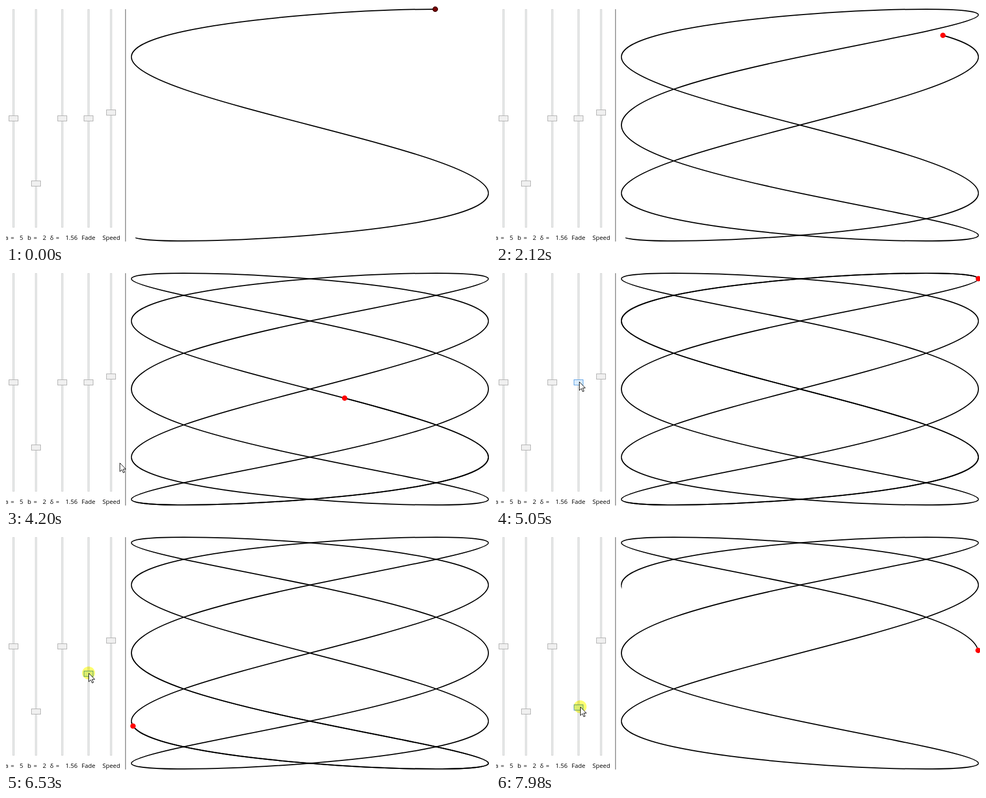
Animation, 903 px wide and 442 px high, one loop 8000 ms. Source, as an HTML page without scripts:

```html
<!DOCTYPE html>
<html lang="en">
<head>
<meta charset="utf-8">
<title>Lissajous curve</title>
<style>
/* --s counts the screen updates; everything else is derived from it. */
@property --s { syntax: "<number>"; inherits: true; initial-value: 0; }

@keyframes tick {
  0% { --s: 0; animation-timing-function: steps(1); }
  0.8125% { --s: 1; }
  11.0625% { --s: 12; }
  21.6875% { --s: 23; }
  32.1875% { --s: 34; }
  42.8125% { --s: 45; }
  53.4375% { --s: 56; }
  64.0625% { --s: 67; }
  74.8125% { --s: 78; }
  85.3125% { --s: 89; }
  95.9375% { --s: 100; animation-timing-function: steps(4); }
  99.6875%, 100% { --s: 104; }
}

html {
  height: 100%;
  background: #fff;
  overflow: hidden;
  animation: tick 8s steps(11) infinite;
}

body {
  position: relative;
  height: 100%;
  margin: 0;
  overflow: hidden;

  /* points plotted so far; plotting slows while the mouse moves */
  --n: calc(5 * var(--s)
    - 0.2 * clamp(0, var(--s) - 45, 11)
    - 0.582 * clamp(0, var(--s) - 56, 11)
    - 0.127 * clamp(0, var(--s) - 67, 11));

  /* how far the Fade thumb has been dragged down */
  --drag: calc(1.5 * clamp(0, var(--s) - 67, 10)
    + 4.53 * clamp(0, var(--s) - 77, 16)
    + 2.08 * clamp(0, var(--s) - 93, 6)
    + 2.9 * clamp(0, var(--s) - 99, 5));

  /* angles of both trail ends */
  --head: calc(11.774 + 0.1 * var(--n));
  --tail: calc(11.774 + 0.1 * max(-84, var(--n) - 2.435 * (205 - var(--drag))));

  /* mouse pointer */
  --mx: calc(212px - 5.7px * clamp(0, var(--s) - 55, 10)
    - 0.125px * clamp(0, var(--s) - 77, 16)
    + 0.67px * clamp(0, var(--s) - 93, 6)
    + 10px * clamp(0, 55 - var(--s), 2));
  --my: calc(361px - 15.2px * clamp(0, var(--s) - 55, 10)
    + 1px * var(--drag)
    + 30px * clamp(0, 55 - var(--s), 2));
}

svg {
  position: absolute;
  left: 0;
  top: 0;
  width: 903px;
  height: 442px;
}

/* Each half wave is monotone in x, so a clip between both ends reveals it. */
.trail svg {
  --from: calc(334.5px * cos(clamp(0, var(--tail) - var(--k) * pi, pi)));
  --to: calc(334.5px * cos(clamp(0, var(--head) - var(--k) * pi, pi)));
  clip-path: inset(0 calc(336px - var(--from)) 0 calc(567px + var(--to)));
  fill: none;
  stroke: #000;
  stroke-width: 2;
}
.trail svg:nth-child(odd) {
  clip-path: inset(0 calc(336px + var(--to)) 0 calc(567px - var(--from)));
}
.trail use { transform: translate(567px, 223px); }

.dot {
  transform: translate(
    calc(567px + 333px * cos(var(--head))),
    calc(223px + 217px * sin(0.4 * var(--head))));
}
.dark { opacity: clamp(0, 1 - var(--s), 1); }

.track { fill: #e7eaea; stroke: #d6d6d6; }
.thumb { fill: #f0f0f0; stroke: #acacac; }
.fade { transform: translate(154px, calc(210.5px + 1px * var(--drag))); }
.hover { fill: #daecfc; stroke: #569de5; opacity: clamp(0, var(--s) - 64, 1); }
.press {
  fill: #ffff70;
  mix-blend-mode: multiply;
  opacity: clamp(0, var(--s) - 66, 1);
  transform: translate(var(--mx), var(--my));
}
.mouse {
  fill: #fff;
  stroke: #000;
  opacity: clamp(0, var(--s) - 53, 1);
  transform: translate(var(--mx), var(--my));
}
text { font: 11.4px "Open Sans", "Noto Sans", sans-serif; word-spacing: 1.5px; }
</style>
</head>
<body>
<svg>
  <defs>
    <path id="w0" d="M333 0C333 22.7 297.1 45.5 235.5 67.1S87.2 109.2 0 127.5S-173.8 162.2 -235.5 175.6S-333 199.4 -333 206.4"/>
    <path id="w1" d="M-333 206.4C-333 213.4 -297.1 217 -235.5 217S-87.2 213.4 0 206.4S173.8 188.9 235.5 175.6S333 145.9 333 127.5"/>
    <path id="w2" d="M333 127.5C333 109.2 297.1 88.7 235.5 67.1S87.2 22.7 0 0S-173.8 -45.5 -235.5 -67.1S-333 -109.2 -333 -127.5"/>
    <use id="w3" href="#w1" transform="scale(-1)"/>
    <use id="w4" href="#w0" transform="scale(-1)"/>
    <use id="w5" href="#w0" transform="scale(-1 1)"/>
    <use id="w6" href="#w1" transform="scale(-1 1)"/>
    <use id="w7" href="#w2" transform="scale(-1 1)"/>
    <use id="w8" href="#w1" transform="scale(1 -1)"/>
    <use id="w9" href="#w0" transform="scale(1 -1)"/>
    <rect id="track" x="-1.5" y="6.5" width="3" height="408"/>
    <rect id="thumb" x="-8.5" y="-5" width="17" height="10"/>
  </defs>
</svg>

<div class="trail">
  <svg style="--k:1"><use href="#w1"/></svg>
  <svg style="--k:2"><use href="#w2"/></svg>
  <svg style="--k:3"><use href="#w3"/></svg>
  <svg style="--k:4"><use href="#w4"/></svg>
  <svg style="--k:5"><use href="#w5"/></svg>
  <svg style="--k:6"><use href="#w6"/></svg>
  <svg style="--k:7"><use href="#w7"/></svg>
  <svg style="--k:8"><use href="#w8"/></svg>
  <svg style="--k:9"><use href="#w9"/></svg>
  <svg style="--k:10"><use href="#w0"/></svg>
  <svg style="--k:11"><use href="#w1"/></svg>
  <svg style="--k:12"><use href="#w2"/></svg>
  <svg style="--k:13"><use href="#w3"/></svg>
  <svg style="--k:14"><use href="#w4"/></svg>
  <svg style="--k:15"><use href="#w5"/></svg>
  <svg style="--k:16"><use href="#w6"/></svg>
  <svg style="--k:17"><use href="#w7"/></svg>
  <svg style="--k:18"><use href="#w8"/></svg>
  <svg style="--k:19"><use href="#w9"/></svg>
</div>

<svg>
  <g class="dot">
    <circle r="5" fill="#f00"/>
    <circle class="dark" r="4.5" fill="#780000" stroke="#000"/>
  </g>

  <rect x="222" y="6" width="2" height="435" fill="#a0a0a0"/>
  <g class="track">
    <use href="#track" x="14"/>
    <use href="#track" x="56"/>
    <use href="#track" x="105"/>
    <use href="#track" x="154"/>
    <use href="#track" x="196"/>
  </g>
  <g class="thumb">
    <use href="#thumb" x="14" y="210.5"/>
    <use href="#thumb" x="56" y="332.5"/>
    <use href="#thumb" x="105" y="210.5"/>
    <use href="#thumb" x="196" y="199.5"/>
  </g>
  <g class="fade">
    <use class="thumb" href="#thumb"/>
    <use class="hover" href="#thumb"/>
  </g>

  <text x="-2" y="438">a =</text>
  <text x="25.5" y="438">5</text>
  <text x="40" y="438">b =</text>
  <text x="68.5" y="438">2</text>
  <text x="82" y="438">δ =</text>
  <text x="111" y="438">1.56</text>
  <text x="141" y="438">Fade</text>
  <text x="180" y="438">Speed</text>

  <circle class="press" r="12"/>
  <path class="mouse" d="M.5 .5V16.5L4.2 13 6.8 18.8 9.2 17.8 6.7 12H11.6Z"/>
</svg>
</body>
</html>
```
